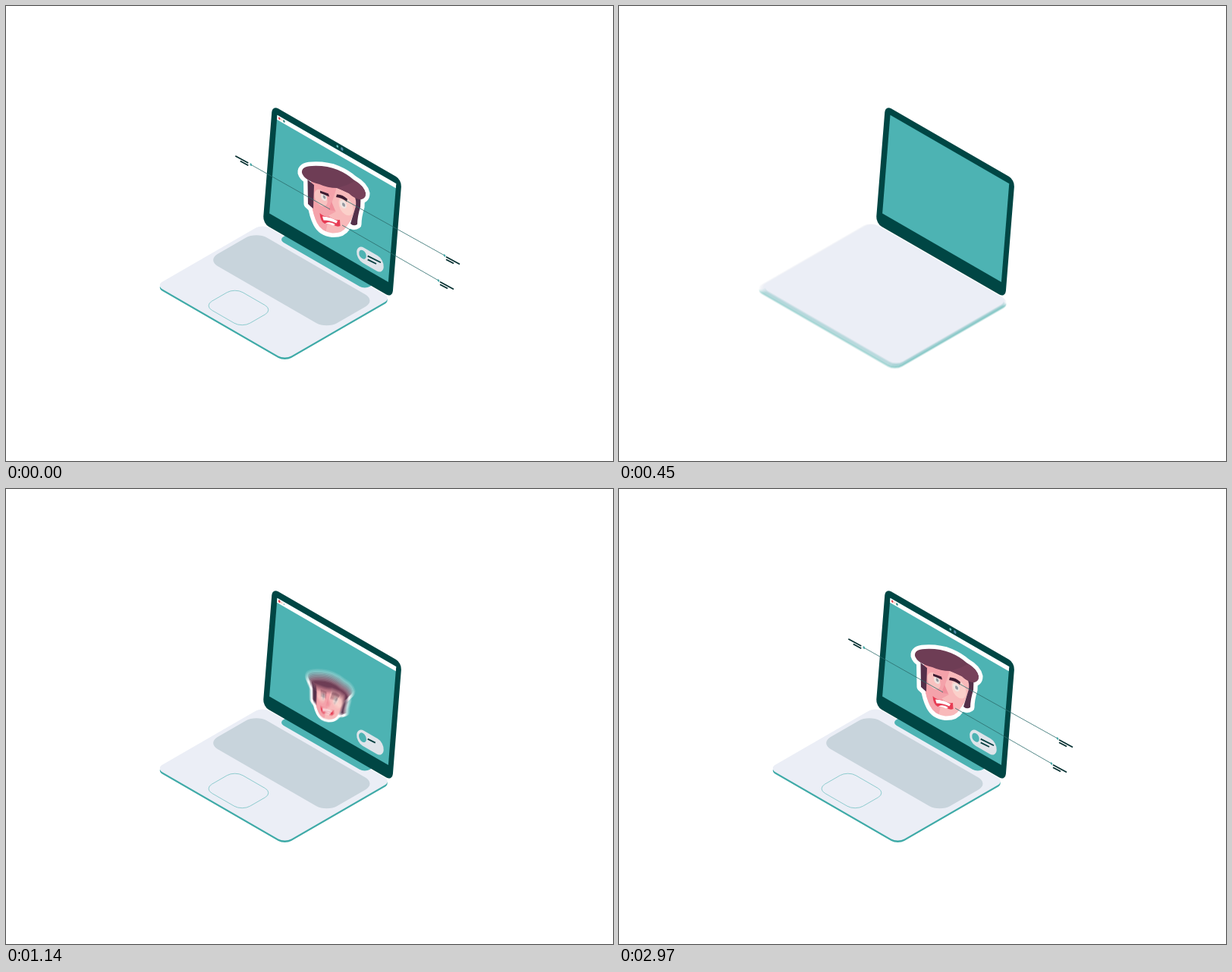
An HTML page with a canvas for the animation above (3 s loop, 800 by 600 pixels).

```html
<!DOCTYPE html>
<html lang="en">
<head>
<meta charset="utf-8">
<title>Laptop</title>
<style>
html, body { margin: 0; width: 100%; height: 100%; overflow: hidden; background: #fff; }
canvas { display: block; }
</style>
</head>
<body>
<canvas id="stage" width="800" height="600"></canvas>
<script>
const W = 800, H = 600, LOOP = 3000;
const RISE = 165, FALL = 165, PEAK = 1.095, SHUTTER = 14, SAMPLES = 10;
const TEAL = '#4db3b3', DARK = '#004644', INK = '#063f40', HAIR = '#6e3d55';

const stage = document.getElementById('stage').getContext('2d');
const makeLayer = () => {
  const cv = document.createElement('canvas');
  cv.width = W;
  cv.height = H;
  return cv.getContext('2d');
};
const sample = makeLayer(), blend = makeLayer();

const clamp = x => Math.max(0, Math.min(1, x));
const smooth = x => { x = clamp(x); return x * x * (3 - 2 * x); };

// Scale from 0 past full size, then back to 1.
function pop(t) {
  if (t <= 0) return 0;
  if (t < RISE) return PEAK * smooth(t / RISE);
  return PEAK + (1 - PEAK) * smooth((t - RISE) / FALL);
}

// Axes of the two tilted planes: desk and display.
const DESK = [0.866, 0.5, -0.866, 0.5];
const WALL = [0.866, 0.5, -0.08, 1];

function panel(c, plane, x, y, w, h, r, fill, stroke) {
  c.save();
  c.transform(...plane, x, y);
  c.beginPath();
  c.roundRect(0, 0, w, h, r);
  c.restore();
  if (fill) { c.fillStyle = fill; c.fill(); }
  if (stroke) { c.strokeStyle = stroke; c.lineWidth = 0.9; c.stroke(); }
}

function disc(c, x, y, r, fill, plane = WALL) {
  c.save();
  c.transform(...plane, x, y);
  c.beginPath();
  c.arc(0, 0, r, 0, 7);
  c.restore();
  c.fillStyle = fill;
  c.fill();
}

function shape(c, d, fill) {
  c.fillStyle = fill;
  c.fill(new Path2D(d));
}

function grow(c, x1, y1, x2, y2, p, width, color) {
  if (p <= 0) return;
  c.beginPath();
  c.moveTo(x1, y1);
  c.lineTo(x1 + (x2 - x1) * p, y1 + (y2 - y1) * p);
  c.lineWidth = width;
  c.strokeStyle = color;
  c.stroke();
}

const base = c => {
  panel(c, DESK, 338, 290, 196, 162, 10, '#3eaaa7');
  panel(c, DESK, 338, 287.5, 196, 162, 10, '#ebeef6');
};
const keys = c => panel(c, DESK, 330, 297.5, 182, 75, 16, '#c8d4dc');
const pad = c => panel(c, DESK, 301.7, 371.7, 58, 47, 12, null, '#84c8ca');
const hinge = c => panel(c, DESK, 376.3, 298, 131.5, 20, 8, TEAL);
const lid = c => {
  panel(c, WALL, 351, 130.8, 197, 155.7, 9, DARK);
  panel(c, WALL, 357.5, 143.8, 181, 129.7, 0, TEAL);
};
const bar = c => panel(c, WALL, 357.5, 143.8, 181, 6, 0, '#fff');
const chip = c => panel(c, WALL, 463, 313.8, 41, 20, 10, '#dfe4ea');

const HEAD = 'M402 228 L403 262 Q405 276 410 286 Q416 298 430 299.5 Q443 300 448 292 L455 282 L462 262 L463 245 Z';
const BURNS = 'M397.5 229 L398 261 Q402 265 405 267 L406 236 Z' +
  'M459 250 Q462 256 461 264 L454 287 Q458 291 463 288 Q463 278 467 265 L467.5 251 Z';
const TOP = 'M390 220 Q389 211.5 403 211 Q422 210 437 216 Q449 221 458 229 ' +
  'Q472 237 474 247 Q474 255 466 255 Q458 253 452 247 Q444 243 436 240 ' +
  'Q424 240 413 235 Q393 230 390 220 Z';

function face(c) {
  c.lineJoin = 'round';
  c.strokeStyle = '#fff';
  c.lineWidth = 11;
  for (const d of [HEAD, BURNS, TOP]) c.stroke(new Path2D(d));

  shape(c, HEAD, '#f8b9ba');
  c.save();
  c.clip(new Path2D(HEAD));
  shape(c, 'M395 225 L437 236 L428 264 L435 271 L426 276 L421 300 L395 300 Z', '#f4a2aa');
  c.restore();
  shape(c, BURNS, '#55304a');
  shape(c, TOP, HAIR);
  shape(c, 'M437 240 Q449 237 460 231 Q472 238 474 247 Q474 255 466 255 Q458 253 452 247 Z', '#77415a');

  disc(c, 415, 253, 10, 'rgba(250,215,207,.6)');
  disc(c, 448, 264, 11, 'rgba(252,218,209,.7)');
  disc(c, 419, 252, 4.5, '#efe4e0');
  disc(c, 444.5, 261.5, 5, '#efe4e0');
  disc(c, 419.5, 252, 2.1, '#9298a0');
  disc(c, 445, 262, 2.3, '#9298a0');
  shape(c, 'M414 243.5 L425 247.5 L426 251.5 L414 246.5 Z', '#3d1c31');
  shape(c, 'M436 248.5 Q443 248 450 254.5 L449 258 Q443 253 435 252 Z', '#3d1c31');
  shape(c, 'M429 258 L434 270 L425 269 Z', '#f08f9b');

  shape(c, 'M413.5 273 Q418 278 426 278 Q434 283 440 282 L440.5 290 Q436 292 431 288 Q425 285 420 287 Q414 284 413.5 273 Z', '#e73b53');
  shape(c, 'M417 277.5 Q427 277.5 437 283.5 L435.5 286.5 Q427 282.5 418.5 282.5 Z', '#fff');
  shape(c, 'M421 286.5 Q427 283.5 434 288 L431 289.5 Q426 286.5 421 286.5 Z', '#fff');
}

// Each part: draw, scaling centre, start time.
const parts = [
  [base, 412, 326, 300],
  [keys, 398, 343, 594],
  [pad, 307, 398, 705],
  [hinge, 422, 336, 480],
  [lid, 431, 258, 120],
  [bar, 436, 192.5, 480],
  [c => disc(c, 360.3, 148.2, 1.5, '#e2434f'), 360.3, 148.2, 930],
  [c => disc(c, 363.4, 150, 1.3, '#f6d3c4'), 363.4, 150, 1000],
  [c => disc(c, 366.4, 152, 1.5, '#2f8580'), 366.4, 152, 1070],
  [chip, 480, 333.5, 810],
  [c => disc(c, 470, 327.7, 5.4, TEAL), 470, 327.7, 900],
  [face, 416, 312, 1049],
  [c => disc(c, 436.8, 185, 1.6, '#6cc3bf'), 436.8, 185, 1250],
  [c => disc(c, 442.8, 188.6, 2, '#4f87a5'), 442.8, 188.6, 1370]
];

function scaled(c, draw, x, y, s) {
  c.save();
  c.translate(x, y);
  c.scale(s, s);
  c.translate(-x, -y);
  draw(c);
  c.restore();
}

function drawPart([draw, x, y, start], t) {
  const at = k => pop(t - start + (k - 0.5) * SHUTTER);
  const a = at(0), b = at(1);
  if (b <= 0) return;
  if (Math.abs(b - a) < 0.004) {
    scaled(stage, draw, x, y, pop(t - start));
    return;
  }
  // Motion blur: running average of opaque pictures over the shutter time.
  for (let i = 0; i < SAMPLES; i++) {
    sample.drawImage(stage.canvas, 0, 0);
    scaled(sample, draw, x, y, at((i + 0.5) / SAMPLES));
    blend.globalAlpha = 1 / (i + 1);
    blend.drawImage(sample.canvas, 0, 0);
  }
  stage.drawImage(blend.canvas, 0, 0);
}

// Leader line, end dot and two strokes of a callout.
function callout(t, start, x1, y1, x2, y2, side) {
  const c = stage, p = smooth((t - start) / 220);
  grow(c, x1, y1, x2, y2, p, 0.8, '#2c6c6c');
  const s = pop(t - start - 180);
  if (s > 0) disc(c, x2, y2, 1.6 * s, '#4aa9a8');
  const row = (dx, dy, len, delay) => grow(c, x2 + dx, y2 + dy,
    x2 + dx + side * len, y2 + dy + side * len * 0.54, smooth((t - start - delay) / 150), 1.7, '#052f30');
  if (side > 0) {
    row(2, 1.7, 18, 320);
    row(2, 5.2, 10, 400);
  } else {
    row(-3.5, -2.2, 17, 320);
    row(-3.5, 1, 10.5, 400);
  }
}

function render(ms) {
  let t = ms % LOOP;
  if (t < 30) t = LOOP;
  stage.fillStyle = '#fff';
  stage.fillRect(0, 0, W, H);
  for (const part of parts) drawPart(part, t);
  grow(stage, 476.7, 329.6, 494, 338.2, smooth((t - 1080) / 110), 1.8, INK);
  grow(stage, 476.7, 334.4, 488, 340, smooth((t - 1170) / 110), 1.8, INK);
  callout(t, 1316, 427, 268, 322.8, 209.2, -1);
  callout(t, 1620, 443, 289, 570, 362, 1);
  callout(t, 1950, 447, 256, 578, 329, 1);
}

const begin = performance.now();
function tick() {
  render(performance.now() - begin);
  requestAnimationFrame(tick);
}
tick();
</script>
</body>
</html>
```
